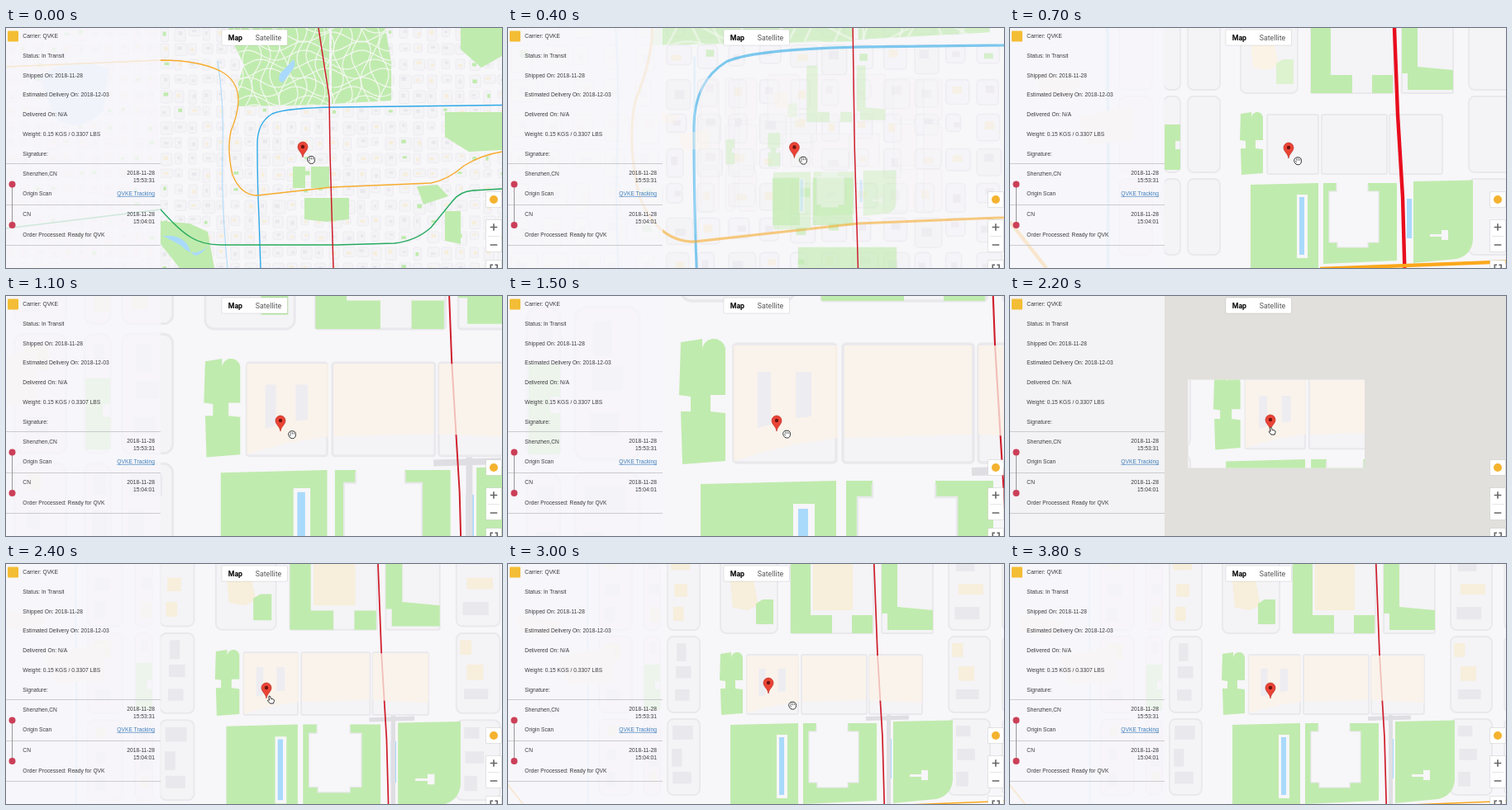
An HTML page with a canvas for the animation above (3900 ms loop, 600 px wide and 291 px high).

```html
<!DOCTYPE html>
<html>
<head>
<meta charset="utf-8">
<style>
html, body { margin: 0; width: 100%; height: 100%; overflow: hidden; }
canvas, svg { position: absolute; left: 0; top: 0; width: 600px; height: 291px; }
text { font: 6.7px "Liberation Sans", Arial, sans-serif; fill: #3c3c40; }
.end { text-anchor: end; }
.tab { font: 8.8px Roboto, sans-serif; fill: #565656; }
.box { fill: #fff; stroke: #00000018; stroke-width: 1; }
.rule { stroke: #cbcbce; }
.sign { stroke: #666; stroke-width: 1.6; fill: none; }
</style>
</head>
<body>
<canvas id="map" width="600" height="291"></canvas>
<svg viewBox="0 0 600 291">
  <rect width="187" height="291" fill="#f8f7fa" fill-opacity=".8"/>
  <rect x="2" y="3.5" width="13" height="13" rx="1" fill="#f3bd35"/>
  <g id="lines"></g>
  <path class="rule" d="M0 164.5H187M0 214.5H187M0 263.5H187"/>
  <path d="M7.5 190V239" stroke="#98989c"/>
  <g fill="#cb3f58"><circle cx="7.5" cy="189.5" r="4"/><circle cx="7.5" cy="239" r="4"/></g>
  <g class="end">
    <text x="180" y="178.3">2018-11-28</text>
    <text x="180" y="187.3">15:53:31</text>
    <text x="180" y="202.9" style="fill:#4080bd;text-decoration:underline">QVKE Tracking</text>
    <text x="180" y="227.8">2018-11-28</text>
    <text x="180" y="236.9">15:04:01</text>
  </g>
  <rect class="box" x="261" y="2" width="79.5" height="19" rx="1"/>
  <text class="tab" x="268.7" y="14.6" style="font-weight:700;fill:#000">Map</text>
  <text class="tab" x="301.7" y="14.6">Satellite</text>
  <rect class="box" x="580.5" y="198.5" width="19" height="19" rx="1"/>
  <circle cx="590" cy="208" r="5" fill="#f4b32f"/>
  <rect class="box" x="580.5" y="232.5" width="19" height="39" rx="1"/>
  <path d="M583 252.5H597" stroke="#e6e6e6"/>
  <path class="sign" d="M585.7 241.5H594.3M590 237.2V245.8M585.7 263H594.3"/>
  <rect class="box" x="580.5" y="281.5" width="19" height="19" rx="1"/>
  <path class="sign" d="M586.3 291V287.2H589M591.5 287.2H594.2V291"/>
</svg>
<script>
const LOOP = 3900;
const LAND = '#f7f6f9', LOT = '#f4f3f6', EDGE = '#e9e8ec', GREEN = '#c0ebae', WATER = '#a9dafc',
      SAND = '#fcf3e7', TAN = '#f7eedb', GREY = '#e9e8ed', EMPTY = '#e1e0dc';
const c = document.getElementById('map').getContext('2d');

const labels = ['Carrier: QVKE', 'Status: In Transit', 'Shipped On: 2018-11-28',
  'Estimated Delivery On: 2018-12-03', 'Delivered On: N/A', 'Weight: 0.15 KGS / 0.3307 LBS',
  'Signature:', 'Shenzhen,CN', 'Origin Scan', 'CN', 'Order Processed: Ready for QVK'];
document.getElementById('lines').innerHTML = labels.map((s, i) =>
  `<text x="20.3" y="${11.8 + 23.87 * i + 1.4 * Math.max(0, i - 8)}">${s}</text>`).join('');

// time, zoom, pin x, pin y, hand distance
const keys = [
  [0, .25, 359, 157, 10],
  [700, 1, 337, 158, 11],
  [1100, 1.57, 332, 164, 14],
  [1500, 2, 325, 164, 12],
  [1900, 3.1, 311, 163, 6],
  [2100, 3.2, 311, 163, 6],
  [2200, 1.17, 315, 163, 2],
  [2500, 1, 315, 163, 7],
  [3000, 1, 315, 163, 29],
  [LOOP, 1, 315, 163, 29]];

function pose(t) {
  const i = Math.max(1, keys.findIndex(k => k[0] >= t));
  const a = keys[i - 1], b = keys[i], p = (t - a[0]) / (b[0] - a[0]);
  return a.map((v, n) => n == 1 ? v * (b[1] / v) ** p : v + (b[n] - v) * p);
}

function random(seed) {
  return () => (seed = seed * 16807 % 2147483647) / 2147483647;
}
function fill(color, d) {
  c.fillStyle = color;
  c.fill(new Path2D(d));
}
function line(color, width, d) {
  c.strokeStyle = color;
  c.lineWidth = width;
  c.stroke(new Path2D(d));
}
function lot(x, y, w, h, r, edge) {
  c.beginPath();
  c.roundRect(x, y, w, h, r);
  c.fillStyle = LOT;
  c.fill();
  c.strokeStyle = EDGE;
  c.lineWidth = edge;
  c.stroke();
}

// wide view of the town
function city() {
  const rnd = random(7);
  for (let x = 0; x < 600; x += 17)
    for (let y = 0; y < 291; y += 19) {
      const w = 8 + rnd() * 7, h = 9 + rnd() * 8;
      lot(x, y, w, h, 2, .7);
      c.fillStyle = rnd() < .12 ? GREEN : rnd() < .4 ? TAN : GREY;
      c.fillRect(x + 2 + rnd() * 3, y + 2 + rnd() * 4, w * .4, h * .3);
    }
  line(WATER, 1, 'M256 40Q264 90 262 150T268 291');
  fill('#d3ecfb', 'M40 60Q80 30 125 50L118 100Q90 130 60 110Z');

  fill(GREEN, 'M187 234L222 237L244 247L252 291H210L187 262ZM361 206H415V232L388 235L361 232Z'
    + 'M347 168h15v26h-15ZM369 168h22v26h-22ZM531 102H600V148L560 150L531 132ZM531 222H550V262L531 258Z'
    + 'M550 0H600V34L575 48L550 26ZM497 192L522 190L535 204L505 214Z');
  fill(WATER, 'M190 252Q215 250 222 268T246 262L240 268Q224 278 212 264Z');

  const park = new Path2D('M269 0L277 22L288 45L281 66L281 95L391 93V0ZM394 0H459L466 42V88L394 92Z');
  c.save();
  c.fillStyle = GREEN;
  c.fill(park);
  c.clip(park);
  c.strokeStyle = '#f3f8f0';
  c.lineWidth = 1.2;
  for (let i = 0; i < 30; i++) {
    const a = rnd() * 9, down = i < 18;
    c.beginPath();
    for (let u = 0; u < 200; u += 4) {
      const v = (down ? i : i - 18) * 11 + 6 * Math.sin(u / 11 + a);
      down ? c.lineTo(270 + v, u) : c.lineTo(270 + u, v);
    }
    c.stroke();
  }
  fill(WATER, 'M348 38Q352 46 344 54L335 66Q328 66 331 56Z');
  c.restore();

  line('#2da9e8', 1.4, 'M308 291L306 230Q304 190 304 140Q304 115 322 104Q338 97 400 96L600 93.500');
  line('#f7ab2c', 1.4, 'M0 47L187 39Q232 39 259 52Q282 64 281 90Q280 106 272 125Q267 148 274 178Q284 203 304 203L394 193L514 188Q535 184 554 167Q575 154 600 150');
  line('#24aa5e', 1.4, 'M0 243L187 220Q210 246 224 254Q238 263 260 263L400 263L470 261Q496 258 514 242L540 210Q549 198 565 197L600 195');
}

// close view of the blocks around the pin
function streets(fine) {
  const rnd = random(11);
  for (const [x, w] of [[110, 40], [164, 20], [193, 39], [533, 50], [598, 40]])
    for (let y = -12; y < 250; y += 100) {
      lot(x, y, w, 92, 7, 1.8);
      for (let i = 0; fine && i < 3; i++) {
        c.fillStyle = rnd() < .45 ? TAN : GREY;
        c.fillRect(x + 4 + rnd() * w * .2, y + 8 + i * 28, w * (.25 + rnd() * .4), 10 + rnd() * 12);
      }
    }
  lot(257, -20, 69, 104, 7, 1.8);
  lot(342, -20, 100, 104, 2, 1.8);
  lot(452, -20, 62, 104, 2, 1.8);
  for (const x of [289, 355, 437]) lot(x, 110, x < 300 ? 62 : x < 400 ? 79 : 64, 72, 2, 1.8);

  fill(GREEN, 'M257 109L270 107V115A5 5 0 0 1 284 113V141H275V151L284 152V181L258 183L257 151H263V142L256 141Z'
    + 'M165 122H184V142H178V152H184V177H165Z');
  fill(GREEN, 'M342 -40H366V62H392V84H342ZM416 62H441V84H416ZM452 -40H471V52L514 56V80H459V60H452Z');
  fill(GREEN, 'M269 195L351 193V320H269ZM357 193H446V287L357 291ZM466 191L538 189.500V262Q536 281 518 285L466 290Z');
  fill(LAND, 'M325 207H338V284H325ZM373 190H411V203H424V265H411V271H374V265H364V203H373Z');
  line(EDGE, 1.2, 'M373 195V203H364V265H374V271H411V265H424V203H411V195');
  fill(WATER, 'M328 210h6v70h-6ZM458 212h6v48h-6Z');
  fill(LAND, 'M486 255h14v-5h8v12h-8v-4h-14Z');
  line('#bfe3fb', fine ? 1.5 : 4, 'M96 -60V80Q98 140 96 330');
  fill(SAND, 'M60 112L128 100V142L72 146ZM10 60L64 70L52 88L14 82Z');

  fill(fine ? TAN : '#faf3e6', 'M269 20L296 16L303 50L290 56L272 53Z');
  fill(fine ? GREEN : '#ddf2cf', 'M300 48L308 43H321V73H300Z');
  if (fine) {
    fill(TAN, 'M369 -20H417V56H369Z');
    line('#dfdee3', 5, 'M460.500 183V320M433 187.500L485 186');
  }
}

function routes(fine, s) {
  const near = s > .8, w = fine ? 1.7 / s ** .7 : near ? 4.4 : 1.5 / s;
  line(near && !fine ? '#e80c1d' : '#cf1d2b', w, near
    ? 'M439 -90L443 5L447 110L453 210L456 320'
    : 'M391 -465L443 -129L447 143L463 699');
  if (near) line('#fba81c', fine ? 1.5 : 4.4, 'M353 297L640 286M-22 240L22 296');
}

function block() {
  c.globalAlpha = .75;
  fill(SAND, 'M289 111H352V167L326 171L305 176L289 181ZM356 111H433V165L356 167ZM437 111H501V168L437 165Z');
  c.globalAlpha = 1;
  fill('#edecf1', 'M303.400 127H311.500V159L303.400 161ZM326.600 127H336V154L326.600 155Z');
}

function pin(x, y) {
  const d = 'M0 0C-.8 -6 -6 -8 -6 -13A6 6 0 0 1 6 -13C6 -8 .8 -6 0 0Z';
  c.save();
  c.translate(x, y);
  fill('#ea4335', d);
  line('#b3261e', .6, d);
  fill('#6b1410', 'M-2.200 -13a2.200 2.200 0 1 0 4.400 0a2.200 2.200 0 1 0 -4.400 0Z');
  c.restore();
}

function hand(x, y, pointing) {
  const d = pointing
    ? 'M-2.500 -4Q-1.200 -5.500 -.5 -3.500L.3 -1L3 -.8Q4.500 0 4 2L3 4.500H-1L-4 1Q-3.500 -.2 -1.800 .6Z'
    : 'M-4 -2Q-3 -4.800 0 -4.500Q4.500 -4.500 4.500 -.5Q4.500 4.500 .5 4.500Q-2.500 4.500 -3.500 2Q-5 0 -4 -2Z';
  c.save();
  c.translate(x, y);
  fill('#fff', d);
  line('#333', 1, d);
  if (!pointing) line('#444', .8, 'M-1.500 -3V-.5M.5 -3V-.5M2.500 -2.500V-.5M-3 0L-1 1.500');
  c.restore();
}

function draw(time) {
  let step = Math.floor(time / 100);
  if (step > 5 && step < 16 && step % 2 == 0) step--;
  const t = step * 100;
  const [, s, x, y, reach] = pose(t);
  const fine = t >= 900, loading = t == 2200;
  const near = Math.min(1, Math.max(0, (s - .35) / .5));

  c.fillStyle = loading ? EMPTY : LAND;
  c.fillRect(0, 0, 600, 291);

  if (near < 1) {
    c.save();
    c.globalAlpha = 1 - near;
    c.translate(x, y);
    c.scale(s * 4, s * 4);
    c.translate(-359, -157);
    city();
    c.restore();
  }

  c.save();
  if (loading) {
    c.beginPath();
    c.rect(215.5, 101.5, 213.5, 107);
    c.clip();
    c.fillStyle = LAND;
    c.fillRect(0, 0, 600, 291);
  }
  c.translate(x, y);
  c.scale(s, s);
  c.translate(-315, -163);
  c.globalAlpha = near;
  if (near) streets(fine);
  c.globalAlpha = 1;
  if (!loading) routes(fine, s);
  if (fine) block();
  c.restore();

  if (t >= 1800 && t <= 2100) {
    c.fillStyle = EMPTY;
    c.fillRect(0, 282, 600, 9);
  }
  const lift = t > 2500 ? Math.max(0, 6 * Math.sin((t - 2500) / 1000 * Math.PI)) : 0;
  pin(x, y - lift);
  if (t < 3300) hand(x + reach, y + reach * .3, t >= 2200 && t < 2700);
}

function tick() {
  draw(performance.now() % LOOP);
  requestAnimationFrame(tick);
}
tick();
</script>
</body>
</html>
```
